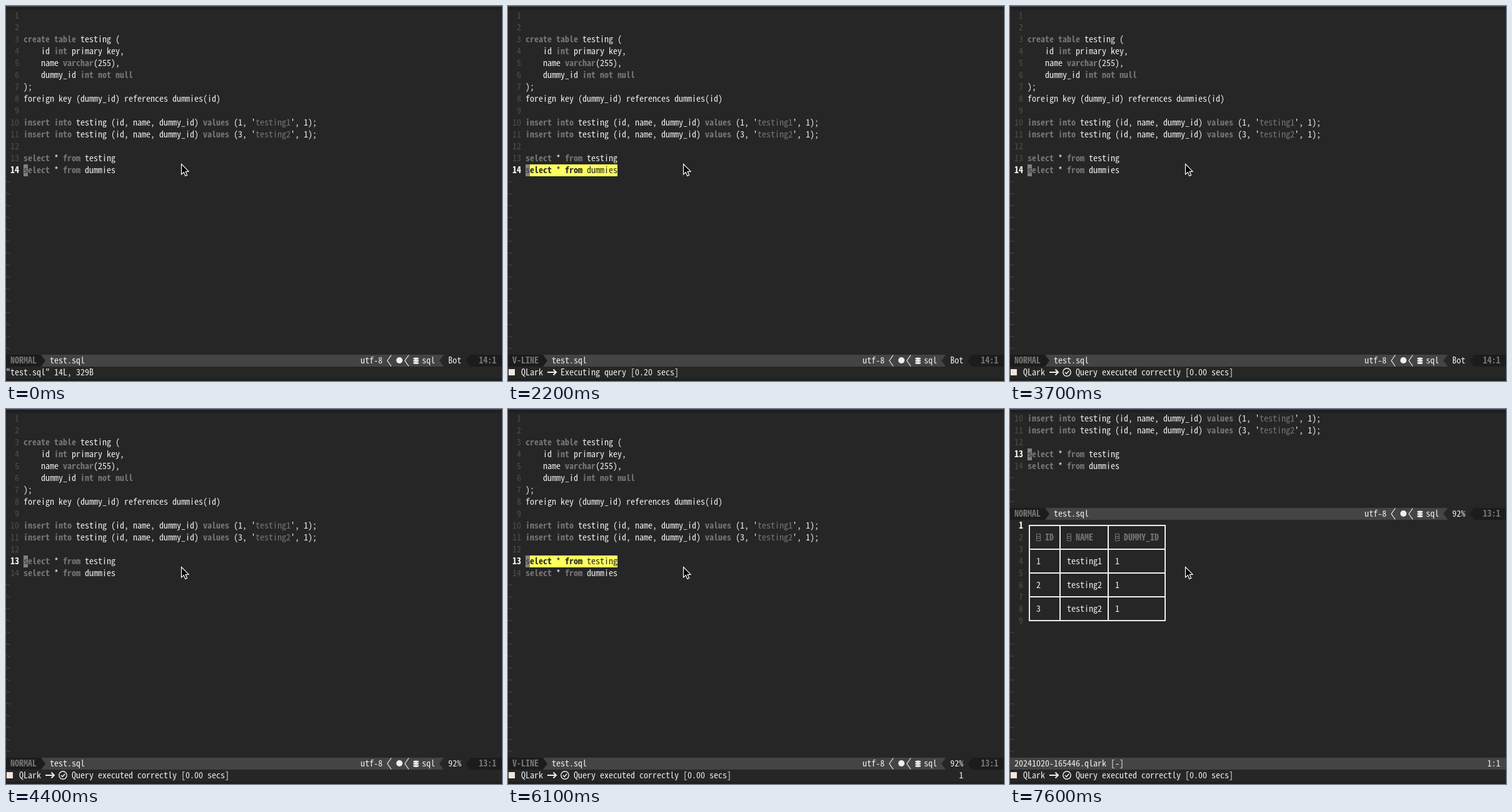
These frames come from a looping animation (793 px wide and 599 px high, 8 s). An HTML page with a canvas:

```html
<!DOCTYPE html>
<html lang="en">
<head>
<meta charset="utf-8">
<title>SQL editor</title>
<style>
html, body { margin: 0; width: 100%; height: 100%; overflow: hidden; background: #262626; }
canvas { display: block; }
</style>
</head>
<body>
<canvas id="stage" width="793" height="599"></canvas>
<script>
const ctx = document.getElementById('stage').getContext('2d', { alpha: false });
const W = 793, H = 599, CELL = 7, ROW = 19, TOP = 6, LOOP = 8000;
const STATUS_ROW = 29, MESSAGE_ROW = 30;
const FAMILY = '"Noto Sans Mono CJK JP", "Noto Sans Mono CJK SC", "Noto Sans Mono", monospace';
const BG = '#262626', FG = '#eeeeee', GREY = '#767676', DIM = '#4e4e4e',
      BAR = '#444444', DARK = '#1c1c1c', YELLOW = '#ffff5f';

// Choose the font size whose advance equals one terminal cell.
ctx.font = `100px ${FAMILY}`;
const SIZE = 100 * CELL / ctx.measureText('0').width;

const SOURCE = [
  '', '',
  'create table testing (',
  '    id int primary key,',
  '    name varchar(255),',
  '    dummy_id int not null',
  ');',
  'foreign key (dummy_id) references dummies(id)',
  '',
  "insert into testing (id, name, dummy_id) values (1, 'testing1', 1);",
  "insert into testing (id, name, dummy_id) values (3, 'testing2', 1);",
  '',
  'select * from testing',
  'select * from dummies'
];
const TOKEN = /\b(?:create|table|int|varchar|not|null|insert|into|values|select|from)\b|testing\d|[^\s]|\s+/g;
const KEYWORD = /^(create|table|int|varchar|not|null|insert|into|values|select|from)$/;

const DUMMIES = {
  file: '20241020-165441.qlark [-]',
  seps: [4, 11, 40, 69, 89, 99, 122],
  head: ['ID', 'CREATE_DATE', 'LAST_MODIFIED', 'CREATED_BY', 'INFO', 'LAST_MODIFIED_BY'],
  rows: [
    ['1', '2024-05-14 15:12:21.83063', 'NULL', 'nilo', '', 'NULL'],
    ['3', '2024-08-08 15:38:15.946871', '2024-08-08 15:38:15.946871', 'unknown', 'brelix', 'NULL'],
    ['2', '2024-05-18 01:35:22.344988', 'NULL', 'edwin marblewhisk', 'dummy 2', 'NULL']
  ]
};
const TESTING = {
  file: '20241020-165446.qlark [-]',
  seps: [4, 11, 22, 35],
  head: ['ID', 'NAME', 'DUMMY_ID'],
  rows: [['1', 'testing1', '1'], ['2', 'testing2', '1'], ['3', 'testing2', '1']]
};

const rowTop = row => TOP + row * ROW;

function rect(x, y, w, h, color) {
  ctx.fillStyle = color;
  ctx.fillRect(x, y, w, h);
}

function path(points, close) {
  ctx.beginPath();
  points.forEach(([x, y]) => ctx.lineTo(x, y));
  if (close) ctx.closePath();
}

function stroke(color, width) {
  ctx.strokeStyle = color;
  ctx.lineWidth = width;
  ctx.stroke();
}

function dot(x, y, r, color) {
  ctx.beginPath();
  ctx.arc(x, y, r, 0, 2 * Math.PI);
  ctx.fillStyle = color;
  ctx.fill();
}

function text(str, col, row, color = FG, bold = false) {
  ctx.font = `${bold ? 'bold ' : ''}${SIZE}px ${FAMILY}`;
  ctx.fillStyle = color;
  [...str].forEach((ch, i) => {
    if (ch !== ' ') ctx.fillText(ch, (col + i) * CELL, rowTop(row) + 14);
  });
}

function codeLine(index, row, state) {
  const active = index + 1 === state.line;
  const selected = active && state.visual;
  const line = SOURCE[index];
  text(String(index + 1).padStart(2), 1, row, active ? '#ffffff' : DIM, active);
  if (selected) rect(28, rowTop(row), line.length * CELL, ROW, YELLOW);
  let col = 4, quoted = false;
  for (const token of line.match(/'|\w+|\s+|[^\w\s]/g) || []) {
    if (token === "'") quoted = !quoted;
    const key = KEYWORD.test(token);
    const muted = key || (quoted && token !== "'");
    text(token, col, row, selected ? BG : muted ? GREY : FG, key);
    col += token.length;
  }
  if (active) {
    rect(28, rowTop(row), CELL, ROW, '#808080');
    text(line[0], 4, row, '#4a4a4a', true);
  }
}

function tildes(from, to) {
  for (let row = from; row < to; row++) text('~', 0, row, DIM);
}

function wedge(col, row, dir, color) {
  const x = col * CELL, y = rowTop(row);
  const base = dir > 0 ? x : x + CELL, tip = dir > 0 ? x + CELL : x;
  path([[base, y], [tip, y + ROW / 2], [base, y + ROW]], true);
  ctx.fillStyle = color;
  ctx.fill();
}

function chevron(col, row) {
  const x = col * CELL, y = rowTop(row);
  path([[x + 7, y + 0.5], [x + 0.7, y + ROW / 2], [x + 7, y + ROW - 0.5]]);
  stroke(FG, 1.2);
}

function databaseIcon(x, y) {
  for (let i = 0; i < 3; i++) {
    ctx.beginPath();
    ctx.ellipse(x, y - 3.3 + i * 3.5, 4.6, 1.7, 0, 0, 2 * Math.PI);
    ctx.fillStyle = FG;
    ctx.fill();
  }
}

function editorStatus(row, state) {
  const y = rowTop(row), mid = y + ROW / 2;
  rect(0, y, W, ROW, BAR);
  rect(0, y, 56, ROW, DARK);
  wedge(8, row, 1, DARK);
  text(state.visual ? 'V-LINE' : 'NORMAL', 1, row, GREY, true);
  text('test.sql', 10, row);
  text('utf-8', 81, row);
  chevron(87, row);
  dot(629, mid - 0.5, 5, FG);
  chevron(91, row);
  databaseIcon(655.5, mid);
  text('sql', 95, row);
  wedge(99, row, -1, BG);
  rect(700, y, W - 700, ROW, BG);
  text(state.line === 14 ? 'Bot' : '92%', 101, row);
  wedge(105, row, -1, DARK);
  rect(742, y, W - 742, ROW, DARK);
  text(state.line + ':1', 108, row, GREY, true);
}

function columnIcon(col, row) {
  const x = col * CELL + 0.5, y = rowTop(row) + 3.5;
  ctx.beginPath();
  ctx.rect(x, y, 6, 11);
  for (const dy of [4, 7]) {
    ctx.moveTo(x, y + dy);
    ctx.lineTo(x + 6, y + dy);
  }
  stroke(GREY, 1);
}

function resultTable({ file, seps, head, rows }) {
  const first = 9, left = seps[0] * CELL + 2;
  const right = seps[seps.length - 1] * CELL + 4;
  for (let i = 0; i < 9; i++) text(String(i + 1), 2, first + i, i ? DIM : '#ffffff', !i);
  for (let i = 0; i < 5; i++) rect(left, rowTop(first + 2 * i) + 8, right - left, 2, FG);
  for (const sep of seps) rect(sep * CELL + 2, rowTop(first) + 8, 2, 8 * ROW + 2, FG);
  head.forEach((name, i) => {
    columnIcon(seps[i] + 2, first + 1);
    text(name, seps[i] + 4, first + 1, GREY, true);
  });
  rows.forEach((row, r) => row.forEach((value, i) => text(value, seps[i] + 2, first + 3 + 2 * r)));
  tildes(18, STATUS_ROW);
  rect(0, rowTop(STATUS_ROW), W, ROW, BAR);
  text(file, 1, STATUS_ROW);
  text('1:1', 109, STATUS_ROW);
}

function message(kind) {
  if (kind === 'file') {
    text('"test.sql" 14L, 329B', 0, MESSAGE_ROW);
    return;
  }
  rect(1, 580, 10, 10, '#f2e6dc');
  text('QLark', 3, MESSAGE_ROW);
  path([[63, 585], [77, 585]]);
  stroke(FG, 2);
  path([[72.5, 580.5], [77, 585], [72.5, 589.5]]);
  stroke(FG, 2);
  if (kind === 'running') {
    text('Executing query [0.20 secs]', 12, MESSAGE_ROW);
    return;
  }
  ctx.beginPath();
  ctx.arc(91, 585, 6.2, 0, 2 * Math.PI);
  stroke(FG, 1.4);
  path([[88, 585], [90.3, 587.3], [94.3, 582.8]]);
  stroke(FG, 1.5);
  text('Query executed correctly [0.00 secs]', 15, MESSAGE_ROW);
}

function pointer(beam) {
  if (beam) {
    for (const [color, width, extra] of [['#ffffff', 3.4, 0.8], ['#000000', 1.2, 0]]) {
      ctx.beginPath();
      for (const y of [243.5, 259.5]) {
        ctx.moveTo(276.8 - extra, y);
        ctx.lineTo(283.2 + extra, y);
      }
      ctx.moveTo(280, 243.5);
      ctx.lineTo(280, 259.5);
      stroke(color, width);
    }
    return;
  }
  path([[280.5, 252.5], [280.5, 269], [284.3, 265.6], [286.8, 271.4],
        [289.6, 270.2], [287.1, 264.6], [292, 264.2]], true);
  ctx.fillStyle = '#000000';
  ctx.fill();
  stroke('#ffffff', 1.2);
}

function stateAt(t) {
  const within = (a, b) => t >= a && t < b;
  const running = within(2200, 2500) || within(7400, 7600);
  return {
    line: t < 4400 ? 14 : 13,
    visual: within(1300, 2500) || within(6000, 7600),
    beam: within(1100, 1400) || within(5600, 6100),
    message: t < 2200 ? 'file' : running ? 'running' : 'done',
    table: within(2500, 3700) ? DUMMIES : t >= 7600 ? TESTING : null
  };
}

function draw(t) {
  const state = stateAt(t);
  rect(0, 0, W, H, BG);
  rect(0, 0, W, TOP, '#1f2020');
  rect(0, 0, W, 1, '#505050');
  rect(0, 595, W, 4, '#1f2020');

  const firstLine = state.table === DUMMIES ? 10 : state.table ? 9 : 0;
  const statusRow = state.table ? 8 : STATUS_ROW;
  for (let i = firstLine; i < SOURCE.length; i++) codeLine(i, i - firstLine, state);
  tildes(SOURCE.length - firstLine, statusRow);
  editorStatus(statusRow, state);
  if (state.table) resultTable(state.table);

  message(state.message);
  if (state.visual && state.message !== 'running') text('1', 103, MESSAGE_ROW);
  pointer(state.beam);
}

const start = performance.now();
function tick() {
  draw((performance.now() - start) % LOOP);
  requestAnimationFrame(tick);
}
tick();
</script>
</body>
</html>
```
